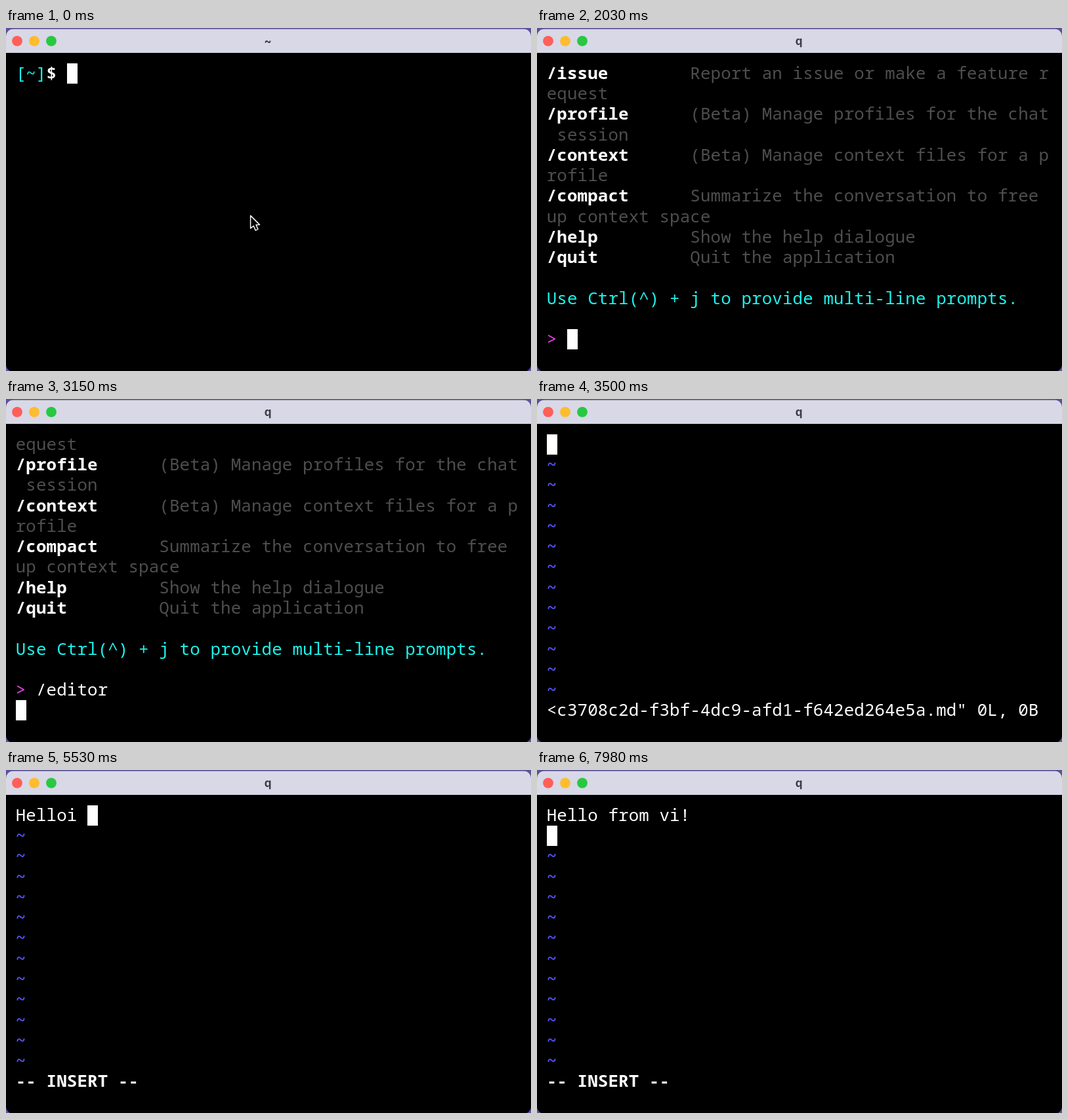
Animation, 800 px wide and 524 px high, one loop 8000 ms. Source, as an HTML page with a canvas:

```html
<!DOCTYPE html>
<html lang="en">
<head>
<meta charset="utf-8">
<title>Terminal</title>
<style>
  html, body { margin: 0; width: 100%; height: 100%; overflow: hidden; background: #5b519f; }
  canvas { display: block; width: 800px; height: 524px; }
</style>
</head>
<body>
<canvas id="stage" width="800" height="524"></canvas>
<script>
const ctx = document.getElementById('stage').getContext('2d');
const LOOP = 8000;
const LEFT = 14.6, TOP = 53.6, CELL_W = 15.62, CELL_H = 31.27, ROWS = 14;
const WHITE = '#ffffff', CYAN = '#1df2ea', PINK = '#ee3fee', GREY = '#4e4e4e', BLUE = '#5452f5';

const HELP = [
  ['/issue', 'Report an issue or make a feature r'],
  ['', 'equest'],
  ['/profile', '(Beta) Manage profiles for the chat'],
  ['', ' session'],
  ['/context', '(Beta) Manage context files for a p'],
  ['', 'rofile'],
  ['/compact', 'Summarize the conversation to free '],
  ['', 'up context space'],
  ['/help', 'Show the help dialogue'],
  ['/quit', 'Quit the application']
];

// Each entry holds a start time and the text shown from then on.
const SHELL = [[0, ''], [70, 'q'], [140, 'q c'], [210, 'q cha'], [280, 'q chat']];
const CHAT = typed('', '/editor', 2100, 140);
const BUFFER = [
  ...typed('', 'He', 4060, 140),
  ...typed('He', 'lloi', 4410, 140),
  [5040, 'Helloi '], [5600, 'Helloi'], [5740, 'Hello'],
  ...typed('Hello', ' from v', 5950, 140),
  [7140, 'Hello from vi'], [7350, 'Hello from vi!']
];
const RUN = 1050, READY = 1400, SEND = 3150, VI = 3290, INSERT = 3710, NEWLINE = 7910;

function typed(prefix, text, start, step) {
  return [...text].map((_, i) => [start + i * step, prefix + text.slice(0, i + 1)]);
}

function at(steps, t) {
  let value = '';
  for (const [time, text] of steps) if (t >= time) value = text;
  return value;
}

function put(text, col, row, color, bold) {
  ctx.font = `${bold ? 700 : 400} 25.8px "Noto Sans Mono", "DejaVu Sans Mono", monospace`;
  ctx.textAlign = 'center';
  ctx.textBaseline = 'alphabetic';
  ctx.fillStyle = color;
  [...text].forEach((ch, i) => {
    if (ch !== ' ') ctx.fillText(ch, LEFT + (col + i + 0.5) * CELL_W, TOP + row * CELL_H + 24.2);
  });
}

function block(col, row) {
  ctx.fillStyle = WHITE;
  ctx.fillRect(Math.round(LEFT + col * CELL_W), Math.round(TOP + row * CELL_H), 16, 31);
}

function drawPointer(x, y) {
  ctx.beginPath();
  [[0, 0], [0, 19.5], [4.6, 15.6], [7.6, 22.5], [11.4, 20.8], [8.4, 14.2], [14, 14]]
    .forEach(([dx, dy]) => ctx.lineTo(x + dx, y + dy));
  ctx.closePath();
  ctx.fillStyle = '#000';
  ctx.fill();
  ctx.lineWidth = 1.5;
  ctx.lineJoin = 'round';
  ctx.strokeStyle = '#f4f4f4';
  ctx.stroke();
}

function drawShell(t) {
  const cmd = at(SHELL, t);
  put('[~]', 0, 0, CYAN);
  put('$', 3, 0, WHITE, true);
  put(cmd, 5, 0, WHITE);
  if (t < RUN) block(5 + cmd.length, 0);
  else block(0, 1);
  if (t < 70) drawPointer(372.6, 286.6);
}

function drawChat(t) {
  const cmd = at(CHAT, t);
  const shift = t >= SEND ? 1 : 0;
  HELP.forEach(([name, info], i) => {
    const row = i - shift;
    if (row < 0) return;
    put(name, 0, row, WHITE, true);
    put(info, name ? 14 : 0, row, GREY);
  });
  put('Use Ctrl(^) + j to provide multi-line prompts.', 0, 11 - shift, CYAN);
  put('>', 0, 13 - shift, PINK);
  put(cmd, 2, 13 - shift, WHITE);
  block(shift ? 0 : 2 + cmd.length, 13);
}

function drawVi(t) {
  const text = at(BUFFER, t);
  const line = t >= NEWLINE ? 1 : 0;
  put(text, 0, 0, WHITE);
  for (let row = line + 1; row < ROWS - 1; row++) put('~', 0, row, BLUE, true);
  block(line ? 0 : text.length, line);
  if (t < INSERT) put('<c3708c2d-f3bf-4dc9-afd1-f642ed264e5a.md" 0L, 0B', 0, 13, WHITE);
  else put('-- INSERT --', 0, 13, WHITE, true);
}

function drawWindow(title) {
  ctx.fillStyle = '#5b519f';
  ctx.fillRect(0, 0, 800, 524);
  ctx.beginPath();
  ctx.roundRect(0, 1.5, 800, 523.5, 11);
  ctx.fillStyle = '#000';
  ctx.fill();
  ctx.beginPath();
  ctx.roundRect(0, 1.5, 800, 36.5, [11, 11, 0, 0]);
  ctx.fillStyle = '#d8d8e7';
  ctx.fill();
  ['#ff5f57', '#febc2e', '#28c840'].forEach((color, i) => {
    ctx.beginPath();
    ctx.arc(17 + i * 26, 19.8, 7.9, 0, Math.PI * 2);
    ctx.fillStyle = color;
    ctx.fill();
  });
  ctx.font = '700 17px Inter, "Open Sans", sans-serif';
  ctx.textAlign = 'center';
  ctx.textBaseline = 'alphabetic';
  ctx.fillStyle = '#3c3b42';
  ctx.fillText(title, 399, 25.5);
}

function frame() {
  const t = performance.now() % LOOP;
  drawWindow(t < RUN ? '~' : 'q');
  if (t < READY) drawShell(t);
  else if (t < VI) drawChat(t);
  else drawVi(t);
  requestAnimationFrame(frame);
}
frame();
</script>
</body>
</html>
```
